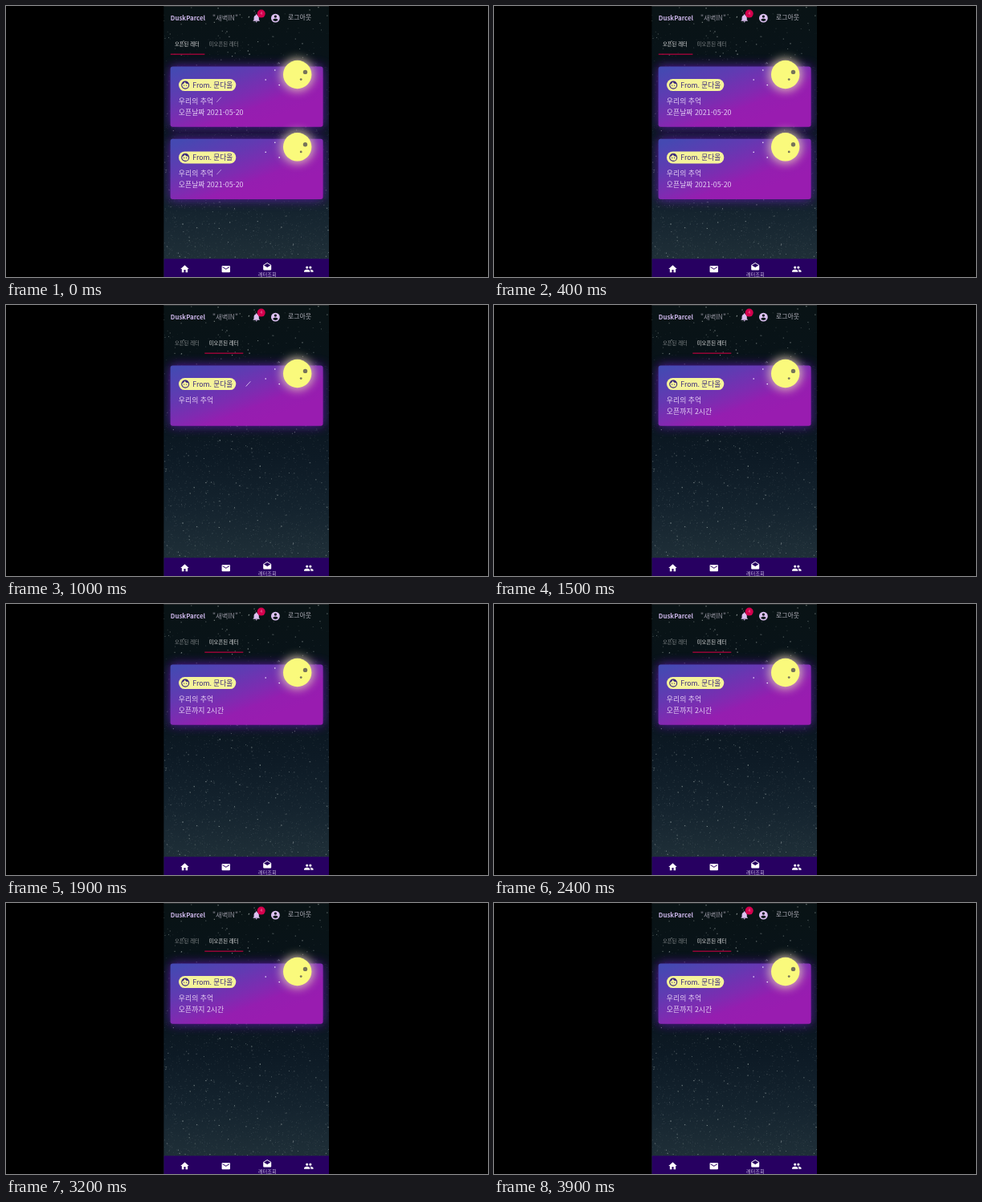
An HTML page with a canvas that plays this animation: 600x338 px, repeating every 4 s.

```html
<!DOCTYPE html>
<html lang="ko">
<head>
<meta charset="utf-8">
<style>
html, body { margin: 0; width: 100%; height: 100%; overflow: hidden; background: #000; }
#sky, #ui { position: absolute; left: 0; top: 0; width: 600px; height: 338px; }
text { font-family: "Noto Sans CJK KR", "Noto Sans CJK", "Noto Sans", sans-serif; font-weight: 300; }
.bold { font-weight: 700; }
</style>
</head>
<body>
<canvas id="sky" width="600" height="338"></canvas>
<svg id="ui" viewBox="0 0 600 338" xmlns="http://www.w3.org/2000/svg">
  <defs>
    <linearGradient id="violet" gradientUnits="userSpaceOnUse" x1="270" y1="58" x2="305" y2="150">
      <stop offset="0" stop-color="#4549b2"/>
      <stop offset=".35" stop-color="#623ab2"/>
      <stop offset=".62" stop-color="#7f2bb1"/>
      <stop offset=".8" stop-color="#951eb0"/>
      <stop offset="1" stop-color="#991cb0"/>
    </linearGradient>
    <filter id="glow" x="-40%" y="-60%" width="180%" height="220%"><feGaussianBlur stdDeviation="7"/></filter>
    <filter id="halo" x="-80%" y="-80%" width="260%" height="260%"><feGaussianBlur stdDeviation="5.500"/></filter>
    <clipPath id="phone"><rect x="196.400" width="205.600" height="338"/></clipPath>

    <path id="home" d="M10 20v-6h4v6h5v-8h3L12 3 2 12h3v8z"/>
    <path id="mail" d="M4 4H20Q22 4 22 6V18Q22 20 20 20H4Q2 20 2 18V6Q2 4 4 4zM20 8V6l-8 5-8-5v2l8 5z" fill-rule="evenodd"/>
    <path id="opened" d="M22 8Q22 7 21 6.300L12 1 3 6.300Q2 7 2 8V18Q2 20 4 20H20Q22 20 22 18zM12 13L3.700 7.800 12 3l8.300 4.800z" fill-rule="evenodd"/>
    <g id="people">
      <circle cx="8" cy="8" r="3"/><circle cx="16" cy="8" r="3"/>
      <path d="M8 13c-2.300 0-7 1.200-7 3.500V19h14v-2.500C15 14.200 10.300 13 8 13zM16 13h-1q2 1.500 2 3.500V19h6v-2.500C23 14.200 18.300 13 16 13z"/>
    </g>
    <path id="bell" d="M12 22q2 0 2-2h-4q0 2 2 2zM18 16v-5c0-3-1.600-5.600-4.500-6.300V4a1.500 1.500 0 0 0-3 0v.7C7.600 5.400 6 8 6 11v5l-2 2v1h16v-1z"/>
    <path id="account" d="M12 2a10 10 0 1 0 0 20 10 10 0 1 0 0-20zM12 5a3 3 0 1 1 0 6 3 3 0 1 1 0-6zM12 19.200q-4 0-6-3.200c0-2 4-3.100 6-3.100s6 1.100 6 3.100q-2 3.200-6 3.200z" fill-rule="evenodd"/>
    <g id="face">
      <circle cx="12" cy="12" r="9" fill="none" stroke="#3d2a7c" stroke-width="2.200"/>
      <path d="M3.500 11Q8.500 9.500 10.500 4.500Q14 10 20.500 9.500L18 5 12 2.500 6 5z"/>
      <circle cx="9" cy="13" r="1.400"/><circle cx="15" cy="13" r="1.400"/>
    </g>
  </defs>
  <g clip-path="url(#phone)">
    <g id="head"></g>
    <g id="cards"></g>
    <g id="nav"></g>
  </g>
</svg>
<script>
const NS = 'http://www.w3.org/2000/svg';
const LOOP = 4000;
const SWAP = 450;       // list changes to unopened letters
const TAB = 550;        // tab switch begins
const COUNTDOWN = 1500; // remaining time shows up
const PASSES = [-420, 820, 2420];
const FLIGHT = 520;
const LEFT = 196.4, WIDTH = 205.6;
const $ = id => document.getElementById(id);

function add(parent, tag, attrs, content = '') {
  const el = document.createElementNS(NS, tag);
  for (const key in attrs) el.setAttribute(key, attrs[key]);
  el.textContent = content;
  return parent.appendChild(el);
}
const label = (parent, x, y, size, fill, str, more) =>
  add(parent, 'text', { x, y, 'font-size': size, fill, ...more }, str);
const dot = (parent, cx, cy, r, fill, more) =>
  add(parent, 'circle', { cx, cy, r, fill, ...more });
const icon = (parent, name, cx, cy, size, fill) =>
  add(parent, 'use', {
    href: '#' + name, fill,
    transform: `translate(${cx - size / 2} ${cy - size / 2}) scale(${size / 24})`
  });

function paintSky() {
  const c = $('sky').getContext('2d');
  const shade = c.createLinearGradient(0, 0, 0, 316);
  [[0, '#091315'], [.3, '#08131a'], [.6, '#0d1a25'], [.8, '#14232e'], [1, '#1f2f38']]
    .forEach(([at, color]) => shade.addColorStop(at, color));
  c.fillStyle = shade;
  c.fillRect(LEFT, 0, WIDTH, 338);
  let seed = 77;
  const rnd = () => (seed = seed * 16807 % 2147483647) / 2147483647;
  for (let i = 0; i < 2600; i++) {
    const bright = i < 300;
    const size = bright ? .7 + rnd() * .6 : .8;
    const depth = bright ? rnd() : Math.sqrt(rnd());
    c.fillStyle = `rgba(205,215,210,${bright ? .2 + rnd() * .45 : .04 + rnd() * .16})`;
    c.fillRect(LEFT + rnd() * WIDTH, depth * 316, size, size);
  }
  c.fillStyle = '#25292b';
  c.fillRect(LEFT, 0, WIDTH, 1);
}

function makeCard(dy) {
  const g = add($('cards'), 'g', { transform: `translate(0 ${dy})` });
  const box = { x: 204.6, y: 75.5, width: 190, height: 75.3, rx: 3 };
  add(g, 'rect', { ...box, fill: '#6a1cc0', opacity: .85, filter: 'url(#glow)' });
  add(g, 'rect', { ...box, fill: 'url(#violet)' });
  dot(g, 362.7, 85.5, 21, '#f6e6bc', { opacity: .68, filter: 'url(#halo)' });
  dot(g, 362.7, 85.5, 17.7, '#fafa7c');
  dot(g, 372.5, 82.4, 2.7, '#77745a');
  dot(g, 367.2, 91.6, 1.4, '#77745a');
  [[323.2, 92], [340.2, 98.6], [334.8, 80]].forEach(([x, y]) => dot(g, x, y, .8, '#f5f0ff'));
  add(g, 'rect', { x: 215, y: 91.1, width: 71.3, height: 15, rx: 7.5, fill: '#f5f39a' });
  icon(g, 'face', 223.2, 98.6, 12, '#3d2a7c');
  label(g, 232.3, 101.5, 8.7, '#3d2a7c', 'From. 문다올', { style: 'font-weight:500' });
  label(g, 214.8, 121.6, 8.9, '#e3cdf2', '우리의 추억');
  const note = label(g, 214.8, 136, 8.9, '#e3cdf2', '');
  const meteor = add(g, 'line', {
    x1: -2.6, y1: 2.8, x2: 2.6, y2: -2.8, stroke: '#e6d6f8', 'stroke-width': .8, 'stroke-linecap': 'round'
  });
  return { g, note, meteor };
}

function makeHead() {
  const g = $('head');
  label(g, 204.8, 17.7, 7.9, '#cbb5e8', 'DuskParcel', { class: 'bold' });
  label(g, 257, 18, 8.4, '#93929e', '"새벽IN"');
  icon(g, 'bell', 311.7, 15.2, 12.5, '#dcc0f0');
  dot(g, 317.7, 9.6, 5, '#d4004d');
  label(g, 317.7, 11.3, 4.5, '#e88fb2', '4', { 'text-anchor': 'middle' });
  icon(g, 'account', 335.4, 15.2, 13, '#dcc0f0');
  label(g, 351, 16.8, 7.9, '#b4b4be', '로그아웃');
  const tabs = [
    label(g, 210, 50.4, 6.3, '#f2f2f2', '오픈된 레터'),
    label(g, 252.8, 50.4, 6.3, '#f2f2f2', '미오픈된 레터')
  ];
  const bar = add(g, 'rect', { y: 59.5, height: 1.4, fill: '#a0053a' });
  return { tabs, bar };
}

function makeNav() {
  const g = $('nav');
  add(g, 'rect', { x: LEFT, y: 315.3, width: WIDTH, height: 23, fill: '#270061' });
  icon(g, 'home', 222.5, 328, 12.5, '#fff');
  icon(g, 'mail', 273.8, 328.2, 12.5, '#fff');
  icon(g, 'opened', 325.2, 325.6, 12, '#fff');
  icon(g, 'people', 376.8, 328.2, 12.5, '#fff');
  label(g, 325.3, 336.6, 6.2, '#c9bce2', '레터조회', { 'text-anchor': 'middle' });
}

paintSky();
const { tabs, bar } = makeHead();
const cards = [makeCard(0), makeCard(90.3)];
makeNav();

const clamp = v => Math.min(1, Math.max(0, v));
const mix = (a, b, k) => a + (b - a) * k;

function draw(t) {
  const k = clamp((t - TAB) / 300);
  const slide = k * k * (3 - 2 * k);
  bar.setAttribute('x', mix(204.8, 247.3, slide));
  bar.setAttribute('width', mix(42.6, 48, slide));
  tabs[0].setAttribute('opacity', mix(.92, .52, slide));
  tabs[1].setAttribute('opacity', mix(.52, .92, slide));

  cards[1].g.style.display = t < SWAP ? '' : 'none';
  const note = t < SWAP ? '오픈날짜 2021-05-20' : t < COUNTDOWN ? '' : '오픈까지 2시간';

  const start = PASSES.find(s => t >= s && t < s + FLIGHT);
  const p = start === undefined ? 1 : (t - start) / FLIGHT;
  const x = mix(329, 250, p), y = mix(84.5, 124.5, p);
  const alpha = clamp(p * 6) * clamp((1 - p) * 4);
  for (const card of cards) {
    card.note.textContent = note;
    card.meteor.setAttribute('transform', `translate(${x} ${y})`);
    card.meteor.setAttribute('opacity', alpha);
  }
}

const begin = performance.now();
function tick() {
  draw((performance.now() - begin) % LOOP);
  requestAnimationFrame(tick);
}
tick();
</script>
</body>
</html>
```
